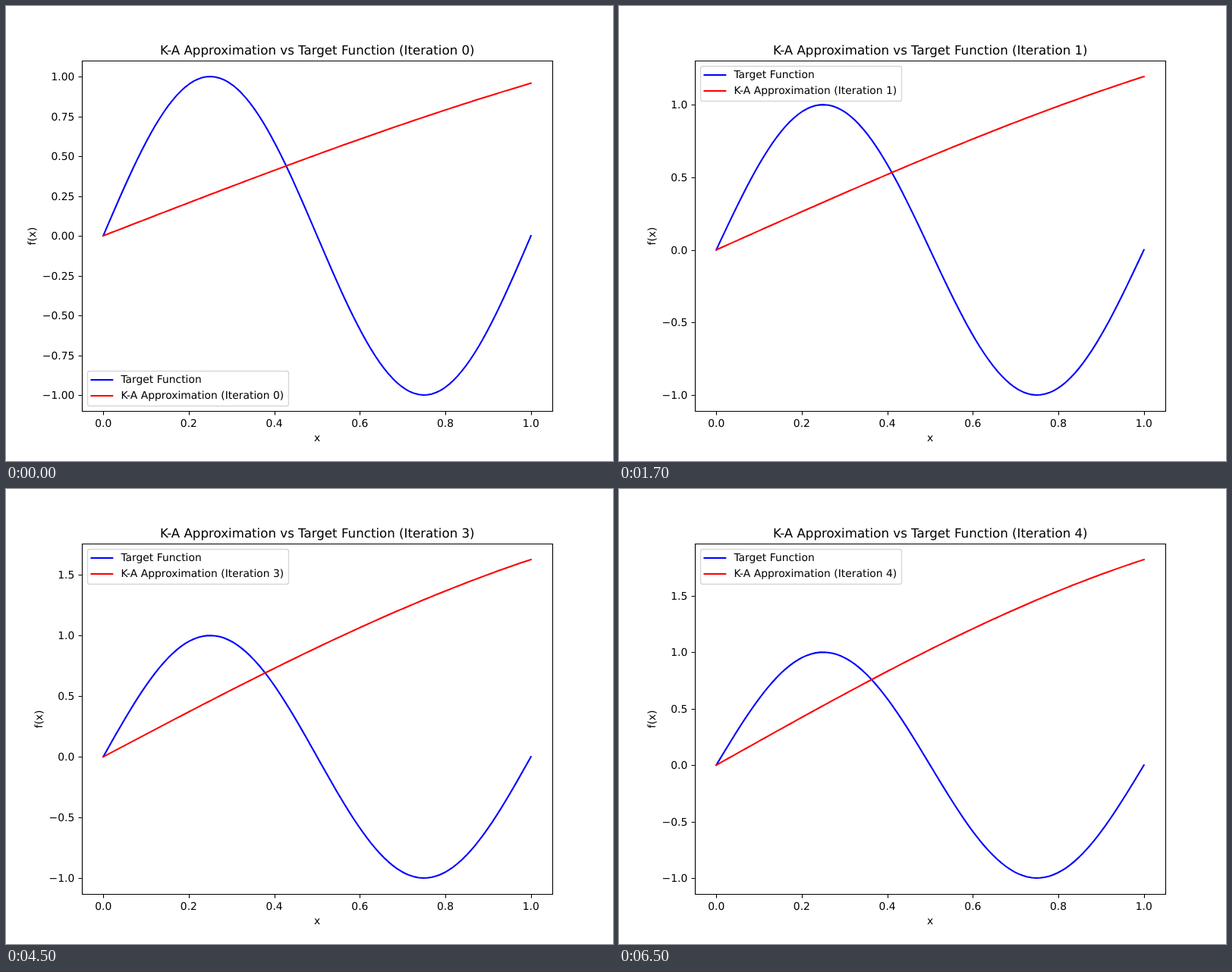
These frames come from a looping animation (800 px wide and 600 px high, 8000 ms). An HTML page:

```html
<!DOCTYPE html>
<html>
<head>
<meta charset="utf-8">
<style>
  html, body { margin: 0; width: 100%; height: 100%; overflow: hidden; background: #fff; }
  svg { display: block; width: 800px; height: 600px; }
  text { font: 13.89px "DejaVu Sans", sans-serif; text-rendering: geometricPrecision; white-space: pre; }
  .title { font-size: 16.67px; }
  .mid { text-anchor: middle; }
  .end { text-anchor: end; }
  .axis { fill: none; stroke: #000; stroke-width: 1.11; }
  .line { fill: none; stroke-width: 2.08; stroke-linecap: square; stroke-linejoin: round; }
</style>
</head>
<body>
<svg id="plot" viewBox="0 0 800 600"></svg>
<script>
const plot = document.getElementById('plot');
const LOOP = 8000, STARTS = [0, 500, 2500, 4500, 6500];
const END_VALUES = [0.958, 1.194, 1.419, 1.6266, 1.8207]; // approximation at x = 1
const BOTTOM = 513, HEIGHT = 420;

const px = x => 128.18 + 563.64 * x;
const snap = v => Math.round(v) + 0.5;
const text = (x, y, s, cls = '', extra = '') =>
  `<text x="${x}" y="${y}" class="${cls}" ${extra}>${s}</text>`;
const path = (d, cls, color) =>
  `<path d="${d}" class="${cls}"${color ? ` stroke="${color}"` : ''}/>`;

function curve(fn, py, color) {
  const points = Array.from({ length: 100 }, (_, i) =>
    `${px(i / 99).toFixed(2)} ${py(fn(i / 99)).toFixed(2)}`);
  return path('M' + points.join('L'), 'line', color);
}

function legend(top, label) {
  const row = (y, s, color) =>
    path(`M112.5 ${y}H140.3`, 'line', color) + text(151.4, y + 4, s);
  return `<rect x="107.5" y="${top + 0.5}" width="265" height="46" rx="2.8"
    fill="#fff" fill-opacity=".8" stroke="#ccc" stroke-opacity=".8" stroke-width="1.39"/>` +
    row(top + 12, 'Target Function', '#00f') + row(top + 33, label, '#f00');
}

function draw(n) {
  const peak = END_VALUES[n], max = Math.max(1, peak);
  const unit = HEIGHT / (max + 1);
  const py = y => BOTTOM - unit * (y + 1);
  const freq = 0.7 + 0.0625 * n, gain = peak / Math.sin(freq);
  const step = n ? 0.5 : 0.25, digits = n ? 1 : 2;

  let ticks = '', labels = '';
  for (let i = 0; i <= 5; i++) {
    const x = px(i / 5);
    ticks += `M${snap(x)} 534.5v5`;
    labels += text(x, 555, (i / 5).toFixed(1), 'mid');
  }
  for (let v = -1; py(v) >= 72; v += step) {
    const y = py(v);
    ticks += `M100.5 ${snap(y)}h-5`;
    labels += text(90.3, Math.round(y) + 5, v.toFixed(digits).replace('-', '\u2212'), 'end');
  }

  const name = `K-A Approximation`, iter = `(Iteration ${n})`;
  const labelX = n ? 48 : 39;
  plot.innerHTML =
    path(ticks, 'axis') + labels +
    curve(x => Math.sin(2 * Math.PI * x), py, '#00f') +
    curve(x => gain * Math.sin(freq * x), py, '#f00') +
    path('M100.5 72.5H720.5V534.5H100.5Z', 'axis') +
    text(410, 574, 'x', 'mid') +
    text(0, 0, 'f(x)', 'mid', `transform="translate(${labelX} 303.5) rotate(-90)"`) +
    text(410.3, 64, `${name} vs Target Function ${iter}`, 'title mid') +
    legend(n ? 79 : 481, `${name} ${iter}`);
}

let shown = -1;
const begin = performance.now();
function tick() {
  const t = (performance.now() - begin) % LOOP;
  const n = STARTS.filter(s => s <= t).length - 1;
  if (n !== shown) draw(shown = n);
  requestAnimationFrame(tick);
}
tick();
</script>
</body>
</html>
```
